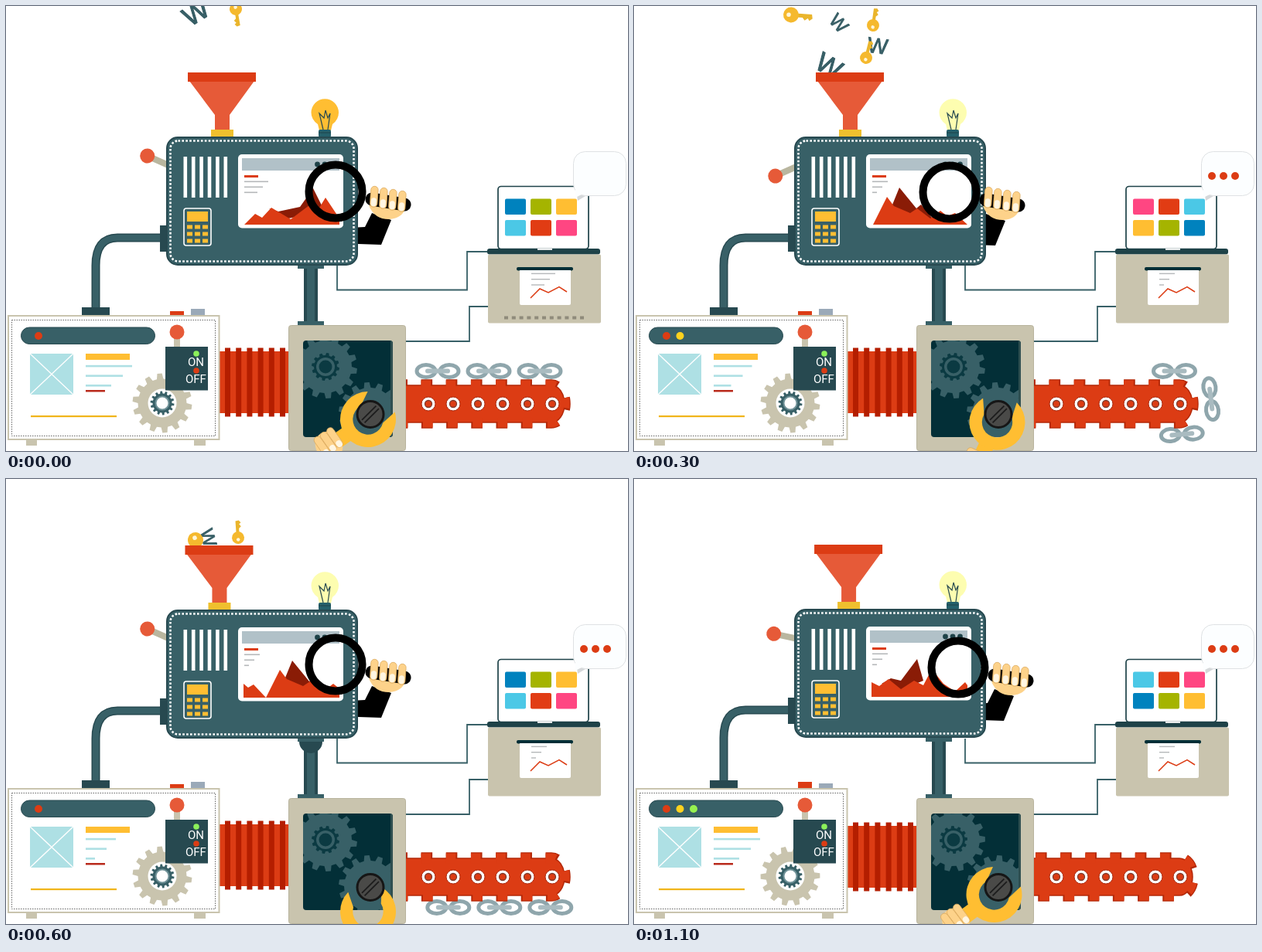
Recreate the animation shown at these times as an HTML page. Size 804x576 px, loop 1200 ms.

```html
<!DOCTYPE html>
<html lang="en">
<head>
<meta charset="utf-8">
<title>Content machine</title>
<style>
html, body { margin: 0; width: 100%; height: 100%; overflow: hidden; background: #fff; }
svg { display: block; width: 100vw; height: 100vh; }
.teal { fill: #386067; } .deep { fill: #274950; } .ink { fill: #1e4248; }
.sand { fill: #c9c4ae; } .red { fill: #dc3c14; } .coral { fill: #e65a38; }
.gold { fill: #ffbe32; } .white { fill: #fff; } .skin { fill: #fdd28a; }
.line { fill: none; stroke: #386067; stroke-width: 1.8; }
.panel { font: 15px Roboto, "Open Sans", sans-serif; }
.letter { font: 35px "Liberation Sans", Arial, sans-serif; fill: #386067; stroke: #315860; }
</style>
</head>
<body>
<svg viewBox="0 0 804 576">
<defs>
  <clipPath id="sky"><rect width="804" height="86"/></clipPath>
  <clipPath id="plot"><rect x="307" y="214" width="124" height="69"/></clipPath>
  <clipPath id="duct"><rect x="370" y="340" width="50" height="69"/></clipPath>
  <clipPath id="window"><rect x="384" y="433" width="116" height="125" rx="4"/></clipPath>
</defs>

<!-- wires -->
<path class="line" d="M428 336V367.500H596V318H624M517 434H599V389H624"/>

<!-- laptop and printer -->
<rect x="636" y="233.500" width="117" height="81" rx="4" fill="#fff" stroke="#1e4248" stroke-width="1.700"/>
<g id="tiles"></g>
<rect class="ink" x="622" y="314" width="146" height="7.500" rx="3"/>
<rect class="white" x="687" y="314" width="19" height="1.800"/>
<rect class="sand" x="623" y="321.500" width="146" height="89" rx="2"/>
<path id="vents" d="M644 403.500H750" stroke="#8f8b7b" stroke-width="4" stroke-dasharray="5 4.800"/>
<rect x="660" y="338" width="73" height="4.500" rx="2" fill="#032f37"/>
<path class="white" d="M664 342H730V385q0 2-2 2H666q-2 0-2-2Z"/>
<g id="printLines"></g>
<path d="M678 378L690 366 701 371 715 363.500 725 370" fill="none" stroke="#dc3c14" stroke-width="1.500"/>
<path d="M737 238L739 252 749 246H766Q772 246 773 240Z" fill="#d5d8da"/>
<rect x="733.500" y="188.500" width="68" height="57" rx="15" fill="#fcfeff" stroke="#dfe2e4"/>
<path d="M736 236V248L746 243Z" fill="#fcfeff"/>
<g id="talk"></g>

<!-- conveyor -->
<g id="chains"></g>
<g id="belt"></g>

<!-- bellows -->
<g id="bellows"></g>

<!-- workshop box -->
<rect class="sand" x="365.500" y="413.500" width="151" height="162" rx="3" stroke="#b8b39d"/>
<rect x="384" y="433" width="116" height="125" rx="4" fill="#032f37"/>
<g clip-path="url(#window)">
  <g id="gearA"></g><g id="gearB"></g>
  <rect x="497" y="433" width="3" height="125" fill="#2f4f50"/>
</g>
<g id="wrench">
  <rect class="gold" x="-10" y="30" width="20" height="40"/>
  <path class="gold" transform="rotate(-18)" d="M-22-28.500A36 36 0 1 0 22-28.500L18-8A19.700 19.700 0 1 1-18-8Z"/>
  <ellipse class="skin" cx="-1" cy="61" rx="19" ry="17"/>
  <g id="grip"></g>
</g>
<g transform="translate(471 528.500) rotate(-45)">
  <circle r="17" fill="#4a4a48" stroke="#161616" stroke-width="3"/>
  <path d="M-13-2.500H13M-13 2.500H13" stroke="#1c1c1c" stroke-width="1.700"/>
</g>

<!-- duct between machine and workshop -->
<rect class="teal" x="385" y="336" width="18" height="76"/>
<rect class="deep" x="385" y="336" width="4" height="76"/><rect class="deep" x="399" y="336" width="4" height="76"/>
<g clip-path="url(#duct)"><circle id="bulge" class="deep" r="15"/></g>
<rect class="teal" x="377" y="335" width="34" height="5"/>
<rect class="teal" x="377" y="408" width="34" height="5"/>

<!-- arm, lever and falling things sit behind the machine -->
<path id="arm" d="M47 28L72 37 59 69 0 67V48L38 46Z"/>
<g id="lever"><path d="M-32 0H0" stroke="#b9b69f" stroke-width="8"/><circle class="coral" cx="-32" r="9.500"/></g>
<g id="items" clip-path="url(#sky)"></g>

<!-- machine -->
<g id="machine">
  <path d="M116 394V336Q116 300 144 300H204" fill="none" stroke="#274950" stroke-width="11"/>
  <path d="M116 394V336Q116 300 144 300H204" fill="none" stroke="#386067" stroke-width="8"/>
  <rect class="deep" x="199" y="284" width="10" height="34"/>
  <g id="funnel">
    <path class="coral" d="M237 97H321L289 141V162H270V141Z"/>
    <rect class="red" x="235" y="86" width="88" height="12"/>
    <rect x="265" y="160" width="29" height="10" fill="#efc02e"/>
  </g>
  <path id="bulb" d="M394.500 138A17.700 17.700 0 0 1 430 138Q430 147 422 153L420 161H405L403 153Q394.500 147 394.500 138Z"/>
  <path d="M410 160L405 139 411 145 413 135 416 145 419 139 416 160" fill="none" stroke="#274950" stroke-width="1.200"/>
  <rect x="404" y="160" width="16" height="10" rx="2" fill="#25606b"/>
  <path d="M404 164H420" stroke="#1e4248"/>
  <rect class="teal" x="208" y="170" width="246" height="165" rx="14" stroke="#274950" stroke-width="2"/>
  <rect x="212.500" y="174.500" width="237" height="156" rx="10" fill="none" stroke="#fff" stroke-width="2.600" stroke-dasharray="2.600 2.300"/>
  <g id="grille"></g>
  <rect class="teal" x="230" y="262" width="35" height="48" rx="3" stroke="#fff" stroke-width="1.600"/>
  <g id="keypad"></g>
  <rect class="white" x="300" y="192" width="136" height="95.500" rx="5"/>
  <rect x="305" y="197" width="126" height="16" fill="#b1c1c8"/>
  <rect class="red" x="308" y="219" width="18" height="3"/>
  <g id="notes"></g>
  <g id="dots"></g>
  <g clip-path="url(#plot)"><g id="chart"></g></g>
</g>

<!-- magnifier -->
<g id="glass">
  <circle r="34.500" fill="none" stroke="#000" stroke-width="10"/>
  <path class="skin" d="M43 18Q50 36 69 36 87 35 91 20Z"/>
  <path d="M47 10L89 17" stroke="#000" stroke-width="17" stroke-linecap="round"/>
  <g id="fingers"></g>
</g>

<!-- control box -->
<rect class="sand" x="26" y="561" width="14" height="8"/><rect class="sand" x="243" y="561" width="15" height="8"/>
<rect id="buttonA" class="red" x="212" width="18" height="9"/>
<rect id="buttonB" x="239" width="18" height="9" fill="#9aa9b8"/>
<rect class="deep" x="98" y="390" width="36" height="10"/>
<rect x="3" y="401" width="272.500" height="160" fill="#fff" stroke="#c9c4ae" stroke-width="2"/>
<rect x="7.500" y="406.500" width="263" height="150" fill="none" stroke="#666" stroke-dasharray="1.500 1.500"/>
<rect class="teal" x="19.500" y="416" width="173" height="21.500" rx="10.700" stroke="#274950"/>
<g id="lights"></g>
<rect x="31" y="450" width="56" height="53" fill="#aee0e4"/>
<path d="M31 450L87 503M87 450L31 503" stroke="#fff" stroke-width="1.300"/>
<rect class="gold" x="103" y="450" width="57" height="8"/>
<g id="copy"></g>
<rect x="103" y="497" width="25" height="2.500" fill="#b92a1c"/>
<rect x="32" y="530" width="111" height="2.200" fill="#f0b418"/>
<g id="gearC"></g>
<circle class="white" cx="202" cy="514" r="18.500"/>
<g id="gearD"></g>
<circle cx="202" cy="514" r="8.500" fill="#fff" stroke="#6f9197" stroke-width="2"/>
<rect class="sand" x="217" y="430" width="8" height="12"/>
<circle class="coral" cx="221" cy="422" r="9.500"/>
<rect class="deep" x="206" y="441" width="55" height="56.500"/>
<circle cx="246" cy="450" r="3.800" fill="#8cf05a"/><circle class="red" cx="246" cy="472" r="3.800"/>
<g class="panel" fill="#fff"><text x="235" y="466">ON</text><text x="232" y="488">OFF</text></g>
</svg>

<script>
const $ = id => document.getElementById(id);
const put = (id, html) => { $(id).innerHTML = html; };
const set = (id, name, value) => $(id).setAttribute(name, value);
const place = (id, x, y, turn = 0) => set(id, "transform", `translate(${x} ${y}) rotate(${turn})`);
const show = (id, on) => set(id, "visibility", on ? "visible" : "hidden");
const rect = (x, y, w, h, more = "") => `<rect x="${x}" y="${y}" width="${w}" height="${h}" ${more}/>`;
const times = (n, fn) => Array.from({ length: n }, (_, i) => fn(i)).join("");
const { PI, sin, cos, floor, min, max } = Math;

// Straight moves between key points [step, ...values]
function along(keys, step) {
  const n = max(1, keys.findIndex(k => k[0] >= step));
  const [a, b] = [keys[n - 1], keys[n]];
  const f = (step - a[0]) / (b[0] - a[0]);
  return a.slice(1).map((v, i) => v + (b[i + 1] - v) * f);
}

function gear(outer, inner, color, teeth = 14) {
  const points = times(teeth, i => [[0, inner], [.12, outer], [.48, outer], [.6, inner]].map(([f, r]) => {
    const a = (i + f) / teeth * 2 * PI;
    return `${r * cos(a)},${r * sin(a)} `;
  }).join(""));
  return `<polygon points="${points}" fill="${color}"/>`;
}

// Fixed repeats
const skin = 'class="skin" stroke="#d9a75c" stroke-width=".7"';
put("grille", times(6, i => rect(229.5 + i * 10.4, 195, 4.6, 53, 'fill="#fff"')));
put("keypad", rect(234, 266, 27, 13, 'class="gold"') +
  times(9, i => rect(234 + i % 3 * 10, 283.5 + floor(i / 3) * 9, 7, 5, 'class="gold"')));
put("dots", times(3, i => `<circle class="ink" cx="${402.5 + i * 9.5}" cy="205" r="3.400"/>`));
put("talk", times(3, i => `<circle class="red" cx="${747 + i * 15}" cy="220" r="5"/>`));
put("fingers", times(4, i => `<g transform="translate(${46 + i * 12} ${i * 2 - 7}) rotate(4)">` +
  rect(0, 0, 9.5, 27, 'rx="4.700" ' + skin) + rect(1.2, 15, 7, 11, 'rx="3.500" fill="#fff6e2"') + "</g>"));
put("grip", times(3, i => rect(-20, 44 + i * 10, 29, 9.5, 'rx="4.700" ' + skin) +
  rect(0, 45 + i * 10, 9, 7.5, 'rx="3.500" fill="#fff6e2"')));
put("bellows", rect(276, 447, 90, 80, 'class="red"') +
  times(6, i => rect(283 + i * 14.2, 442.5, 7, 89, 'fill="#b41e00"')));
put("gearA", gear(41, 34, "#386067") + gear(18, 15, "#0b3a42", 12) +
  '<circle r="12" fill="#386067"/><circle r="8.500" fill="#0b3a42"/>');
put("gearB", gear(40, 33, "#386067"));
put("gearC", gear(38.5, 31.5, "#c9c4ae"));
put("gearD", gear(15.5, 12.5, "#386067"));

const track = 'd="M517 491H705A17 24 0 0 1 705 539H517" pathLength="451.400"';
put("belt", `<path ${track} class="teeth" fill="none" stroke="#b42808" stroke-width="15.500" stroke-dasharray="15 18"/>
  <path ${track} fill="#dc3c14" stroke="#b42808" stroke-width="1.500"/>
  <path ${track} class="teeth" fill="none" stroke="#dc3c14" stroke-width="13" stroke-dasharray="13 20"/>` +
  times(6, i => `<g transform="translate(${546 + i * 32} 515)"><circle r="9" fill="#fff" stroke="#a92a10"/>
  <circle r="4.500" fill="#dc3c14" stroke="#7d3a2c" stroke-width="1.300"/></g>`));

// Falling things drop at a steady pace while they drift and turn
const key = '<path d="M6-2.500H27L28 3 24 6 22 3 18 6 15 2.500H6Z" fill="#eab52c"/><circle r="10" fill="#f5b92e"/><circle cx="-3" r="2.800" fill="#fff6da"/>';
const letter = '<text class="letter" text-anchor="middle" y=".36em">W</text>';
const falls = [
  { art: letter, size: 1, x: [245, 2.5], y: [8, 23], turn: [-32, 21] },
  { art: letter, size: .8, x: [342, -9], y: [-18, 23], turn: [14, -2] },
  { art: letter, size: .7, x: [268, -1], y: [-32, 18], turn: [20, 9] },
  { art: key, size: .8, x: [297, 1], y: [4, 21], turn: [80, -52] },
  { art: key, size: .8, x: [318, -3], y: [-26, 17], turn: [290, -4] },
  { art: key, size: 1, x: [161, 14], y: [-56, 22.5], turn: [-62, 22] },
];
function fall({ art, size, x, y, turn }, step) {
  const at = ([from, pace]) => from + pace * step;
  return `<g transform="translate(${at(x)} ${at(y)}) rotate(${at(turn)}) scale(${size})">${art}</g>`;
}

// Chain links run along the top, round the end and back below
function chain(s) {
  const end = 705, r = 41, bend = PI * r;
  const a = min(max((s - end) / r, 0), PI);
  const run = min(s, end) - max(s - end - bend, 0);
  return `<g transform="translate(${run + r * sin(a)} ${513.5 - r * cos(a)}) rotate(${a * 180 / PI})" fill="none" stroke="#8fa6ac" stroke-width="5">
    <ellipse cx="-15" rx="12" ry="8"/><ellipse cx="15" rx="12" ry="8"/>
    <path d="M-13 0H13" stroke="#a9bbc0" stroke-width="6" stroke-linecap="round"/></g>`;
}
const chainPath = [[0, 558], [2, 600], [4, 797], [6, 835], [8, 864], [11, 864]];

const poly = (points, color) => `<polygon points="${points}" fill="${color}"/>`;
const hills = (dark, light) => poly(dark, "#8a1c06") + poly(light + " 431,283 307,283", "#dc3c14");
const peaks = hills("332,262 343,235 365,262 371,257 386,275 345,280",
  "309,283 327,247 336,259 357,268 366,262 383,275 396,265 405,272 415,268 431,283");
const charts = [
  hills("340,262 352,266 380,260 397,236 410,262 390,270 360,276",
    "308,283 322,269 331,274 343,261 368,276 392,258 402,266 413,248 431,275"),
  peaks,
  poly("307,265 313,270 320,266 336,283 307,283", "#dc3c14") + `<g transform="translate(27)">${peaks}</g>`,
  hills("320,266 332,259 345,262 366,234 374,262 345,274",
    "307,264 317,269 329,260 345,273 362,262 374,268 385,247 400,266 415,276 428,264 431,268"),
];

const glassPath = [[0, 426, 240], [2, 417, 227], [3, 408, 241], [4, 412, 249], [6, 426, 239]];
const wrenchPath = [[0, 468, 535, 55], [4, 470, 540, 15], [6, 468, 560, 10], [8, 458, 553, 48], [12, 468, 533, 55]];

// Three pictures share these colours in different orders
const palette = { b: "#0082be", o: "#a5b400", y: "#ffbe32", c: "#4bc8e6", r: "#e13c14", p: "#ff4682" };
const tileSets = ["boycrp", "prcyob", "crpboy"];
const lights = ["#dc3c14", "#ffd21e", "#96f050"];
const lines = (widths, cut, x, y, gap, h, color) =>
  times(3, i => rect(x, y + i * gap, widths[i] - cut, h, `fill="${color}"`));

function draw(step) {
  const third = floor(step / 2) % 3, lit = floor(step / 2) % 2;
  const quarter = floor(step / 3), late = quarter === 3;

  put("tiles", times(6, i => rect(645 + i % 3 * 33, 249.5 + floor(i / 3) * 27.5, 27, 20.5,
    `rx="2" fill="${palette[tileSets[third][i]]}"`)));
  put("lights", times(third + 1, i => `<circle cx="${42 + i * 17.5}" cy="427" r="5" fill="${lights[i]}"/>`));
  show("talk", lit);
  show("vents", !lit);
  set("bulb", "fill", lit ? "#fdfdb0" : "#ffbe32");

  put("copy", lines([60, 48, 33], quarter % 3 * 10.5, 103, 464.8, 12.6, 2.6, "#aee0e4"));
  put("notes", lines([31, 24, 17], lit * 11, 308, 226.5, 7, 1.6, "#b5b8ba"));
  put("printLines", lines([31, 24, 17], lit * 11, 679, 345.7, 7.3, 1.4, "#b5b8ba"));
  put("chart", charts[quarter]);

  place("machine", 0, late ? -1 : 0);
  place("bellows", 0, late ? 2 : 0);
  place("funnel", -5 * max(0, sin(PI * (step - 4) / 8)), 0);
  set("buttonA", "y", late ? 392 : 395);
  set("buttonB", "y", late ? 394 : 392);

  const swing = cos(PI * step / 3);
  place("lever", 212, 207, 24 * swing);
  const lens = along(glassPath, step % 6);
  place("arm", ...lens);
  place("glass", ...lens);
  place("bulge", 394, 340 + 22 * (step - 6));
  place("wrench", ...along(wrenchPath, step));

  const beat = step % 3, turn = beat * 8.5;
  place("gearA", 413, 467, turn);
  place("gearB", 470, 527, -turn);
  place("gearC", 202, 514, turn);
  place("gearD", 202, 514, -turn);
  document.querySelectorAll(".teeth").forEach(t => t.setAttribute("stroke-dashoffset", -20 - beat * 7.5));

  const [lead] = along(chainPath, step);
  put("chains", times(3, i => step < 8 + i ? chain(lead + 66 * i) : ""));
  put("items", falls.map(f => fall(f, step)).join(""));
}

const start = performance.now();
let shown = -1;
function tick() {
  const step = floor((performance.now() - start) % 1200 / 100);
  if (step !== shown) draw(shown = step);
  requestAnimationFrame(tick);
}
tick();
</script>
</body>
</html>
```
